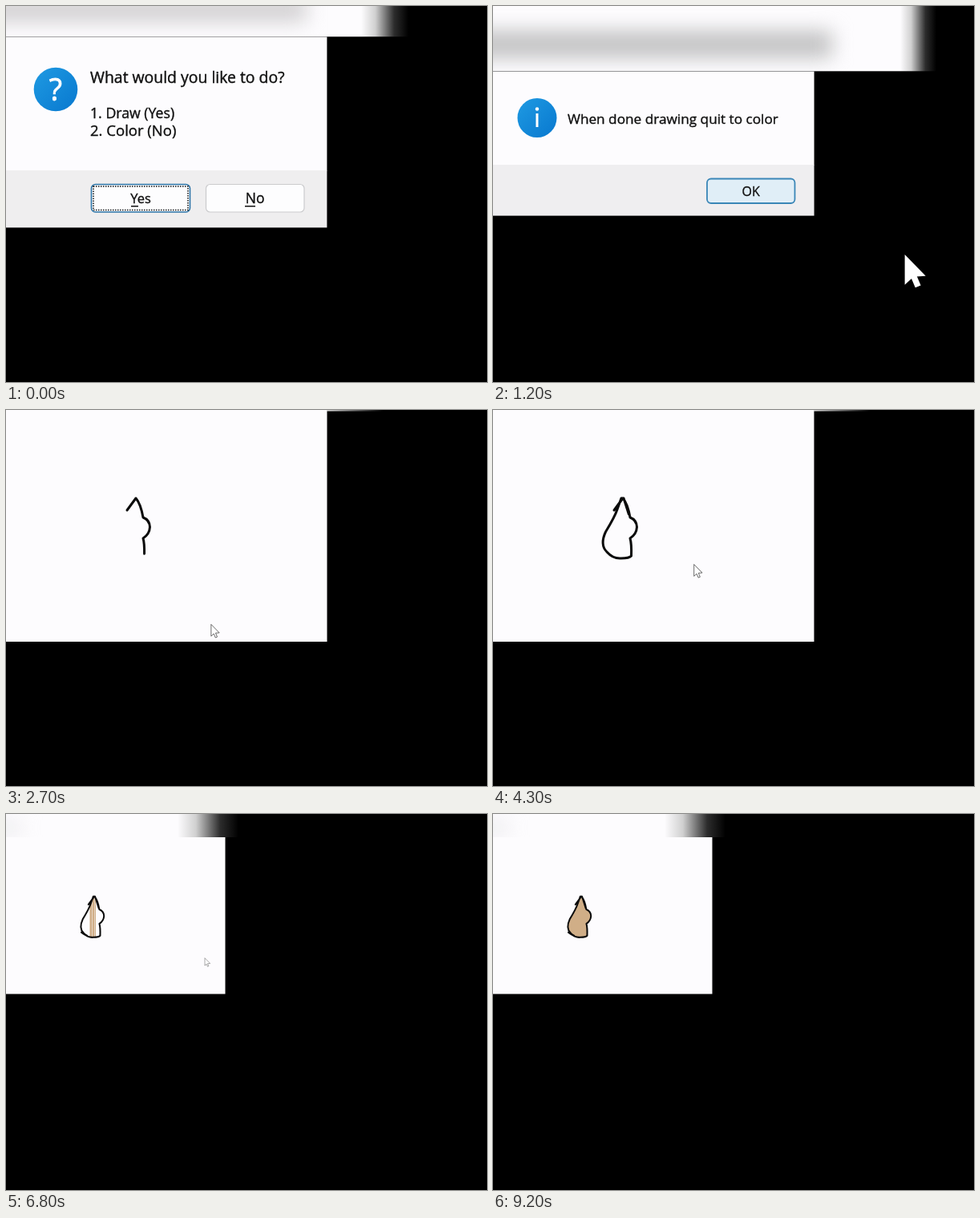
An HTML page with a canvas that plays this animation: 600 px wide and 469 px high, repeating every 9400 ms.

```html
<!DOCTYPE html>
<html lang="en">
<head>
<meta charset="utf-8">
<title>Draw and color</title>
<style>
  html, body { margin: 0; width: 100%; height: 100%; overflow: hidden; background: #000; }
  canvas { display: block; }
  svg { display: none; }
</style>
</head>
<body>
<canvas id="stage" width="600" height="469"></canvas>
<svg>
  <path id="body" d="M151 125L162 110Q168 117 171 134Q179 137 179.5 146Q179 155 171 160Q173 167 172.5 182
    Q170 185 160 185Q150 186 142 177Q133 168 140.5 152Q152 133 155 124L160 110L163 110L170 132"/>
  <path id="touchUp" d="M148.5 182Q143 180 138 176L141 177"/>
</svg>
<script>
const ctx = document.getElementById('stage').getContext('2d');
const LOOP = 9400, PAPER = '#fdfcfe', INK = '#0b0b0b', TAN = '#d0ae87';
const SCREEN_RATIO = 1.5;           // mouse pixels per drawing pixel
const ZOOM_OUT = 0.681;             // size of the drawing in the coloring window

const mix = (a, b, k) => a + (b - a) * k;
const progress = (t, start, end) => Math.min(1, Math.max(0, (t - start) / (end - start)));
const easeOut = k => 1 - (1 - k) ** 2.4;

function stroke(id) {
  const element = document.getElementById(id);
  const length = element.getTotalLength();
  return {
    path: new Path2D(element.getAttribute('d')),
    length,
    at: k => element.getPointAtLength(k * length)
  };
}
const body = stroke('body'), touchUp = stroke('touchUp');

function rect(x, y, w, h, color) {
  ctx.fillStyle = color;
  ctx.fillRect(x, y, w, h);
}

function text(str, x, y, size, align = 'left', color = '#111') {
  ctx.font = `${size}px "Open Sans", "Noto Sans", sans-serif`;
  ctx.textAlign = align;
  ctx.fillStyle = ctx.strokeStyle = color;
  ctx.lineWidth = size / 50;
  ctx.fillText(str, x, y);
  ctx.strokeText(str, x, y);
}

function button(x, y, w, h, label, size, border, fill, lineWidth) {
  ctx.beginPath();
  ctx.roundRect(x, y, w, h, 5);
  ctx.fillStyle = fill;
  ctx.fill();
  ctx.strokeStyle = border;
  ctx.lineWidth = lineWidth;
  ctx.stroke();
  text(label, x + w / 2, y + h / 2 + 6.5, size, 'center');
}

function disc(x, y, r) {
  const shade = ctx.createLinearGradient(x - r, y - r, x + r, y + r);
  shade.addColorStop(0, '#1f9ae2');
  shade.addColorStop(1, '#0878cf');
  ctx.fillStyle = shade;
  ctx.beginPath();
  ctx.arc(x, y, r, 0, 7);
  ctx.fill();
}

function pointer(x, y, scale, outline) {
  ctx.save();
  ctx.translate(x, y);
  ctx.scale(scale, scale);
  const arrow = new Path2D('M0 0V16L3.7 12.6L6 18L8.5 17L6.2 11.6L11 11.3Z');
  ctx.fillStyle = '#fff';
  ctx.fill(arrow);
  ctx.strokeStyle = outline;
  ctx.lineWidth = 0.8;
  ctx.stroke(arrow);
  ctx.restore();
}

// White bar fading to black on the right, with a blurred smear
function blurredBar(height, fadeStart, fadeEnd, smear) {
  ctx.save();
  ctx.beginPath();
  ctx.rect(0, 0, 600, height);
  ctx.clip();
  const fade = ctx.createLinearGradient(fadeStart, 0, fadeEnd, 0);
  fade.addColorStop(0, PAPER);
  fade.addColorStop(0.3, '#d0d0d0');
  fade.addColorStop(0.7, '#2c2c2c');
  fade.addColorStop(1, '#000');
  rect(0, 0, 600, height, fade);
  ctx.filter = 'blur(12px)';
  rect(...smear);
  ctx.restore();
}

function choiceDialog(t) {
  blurredBar(38.5, 443, 502, [-40, -12, 415, 32, '#d2d0d2']);
  rect(0, 38.5, 400.4, 167, PAPER);
  rect(0, 205, 400.4, 71.4, '#efeeef');
  disc(62, 104, 27.3);
  text('?', 62, 117.5, 38, 'center', '#fff');
  text('What would you like to do?', 105, 95.5, 19.4);
  text('1. Draw (Yes)', 105, 139.5, 17.7);
  text('2. Color (No)', 105, 162, 18.5);
  button(106.5, 222.5, 123, 34.5, 'Yes', 16.5, '#2b74a8', '#fdfdfe', 1.6);
  button(249.5, 222.5, 122.5, 34.5, 'No', 17.5, '#cbcbcd', '#fdfdfe', 1.2);
  rect(156, 249, 9, 1.5, '#111');
  rect(298, 249, 13, 1.5, '#111');
  ctx.setLineDash([1.5, 1.5]);
  ctx.strokeStyle = '#111';
  ctx.lineWidth = 1.5;
  ctx.strokeRect(109, 225, 118, 29.5);
  ctx.setLineDash([]);
  const k = progress(t, 400, 900);
  if (k > 0) pointer(mix(335, 172, k), mix(469, 240, k), 2.12, '#fff');
}

function infoDialog() {
  blurredBar(81.6, 508, 553, [-40, 31, 463, 34, '#c2c2c3']);
  rect(0, 81.6, 400.6, 117, PAPER);
  rect(0, 198, 400.6, 63.6, '#efeef0');
  disc(55, 139.5, 24.5);
  rect(53.5, 134, 3, 17, '#fff');
  ctx.beginPath();
  ctx.arc(55, 128.5, 2.2, 0, 7);
  ctx.fill();
  text('When done drawing quit to color', 93, 147, 17.2);
  button(267, 215.5, 109.5, 30.5, 'OK', 16, '#3a86b7', '#e0eef7', 1.8);
  pointer(514.5, 312, 2.12, '#fff');
}

function drawStroke({ path, length }, k) {
  if (k <= 0) return;
  ctx.strokeStyle = INK;
  ctx.lineWidth = 3;
  ctx.lineCap = ctx.lineJoin = 'round';
  ctx.setLineDash([length * k, length]);
  ctx.stroke(path);
  ctx.setLineDash([]);
}

function drawingWindow(t) {
  rect(0, 0, 400.5, 289, PAPER);
  const sliver = ctx.createLinearGradient(400, 0, 470, 0);
  sliver.addColorStop(0, '#ddd');
  sliver.addColorStop(1, '#000');
  rect(400, 0, 70, 1.5, sliver);

  const drawn = easeOut(progress(t, 2200, 4700));
  const hover = progress(t, 4700, 5200);
  const touched = progress(t, 5400, 5700);
  drawStroke(body, drawn);
  drawStroke(touchUp, touched);

  const from = body.at(drawn), to = touchUp.at(touched);
  pointer(mix(from.x, to.x, hover) * SCREEN_RATIO - 3,
          mix(from.y, to.y, hover) * SCREEN_RATIO - 1, 0.9, '#333');
}

function coloringWindow(t) {
  blurredBar(29, 214, 290, [-40, 12, 60, 10, '#e2e2e4']);
  rect(0, 29, 273.5, 195.5, PAPER);

  ctx.save();
  ctx.translate(0, 27.8);
  ctx.scale(ZOOM_OUT, ZOOM_OUT);
  ctx.save();
  ctx.clip(body.path);
  ctx.scale(1 / ZOOM_OUT, 1 / ZOOM_OUT);
  // The fill spreads from the middle in vertical columns
  const spread = 18 * progress(t, 6300, 8700);
  for (let x = Math.round(108 - spread); x < 108 + spread; x++) {
    ctx.globalAlpha = t < 7300 && x % 3 === 2 ? 0.5 : 1;
    rect(x, 60, 1, 80, TAN);
  }
  ctx.restore();
  drawStroke(body, 1);
  drawStroke(touchUp, 1);
  ctx.restore();
  if (t < 8900) pointer(248, 180, 0.57, '#444');
}

function frame(now) {
  const t = now % LOOP;
  rect(0, 0, 600, 469, '#000');
  if (t < 1150) choiceDialog(t);
  else if (t < 2200) infoDialog();
  else if (t < 6100) drawingWindow(t);
  else coloringWindow(t);
  requestAnimationFrame(frame);
}
requestAnimationFrame(frame);
</script>
</body>
</html>
```
